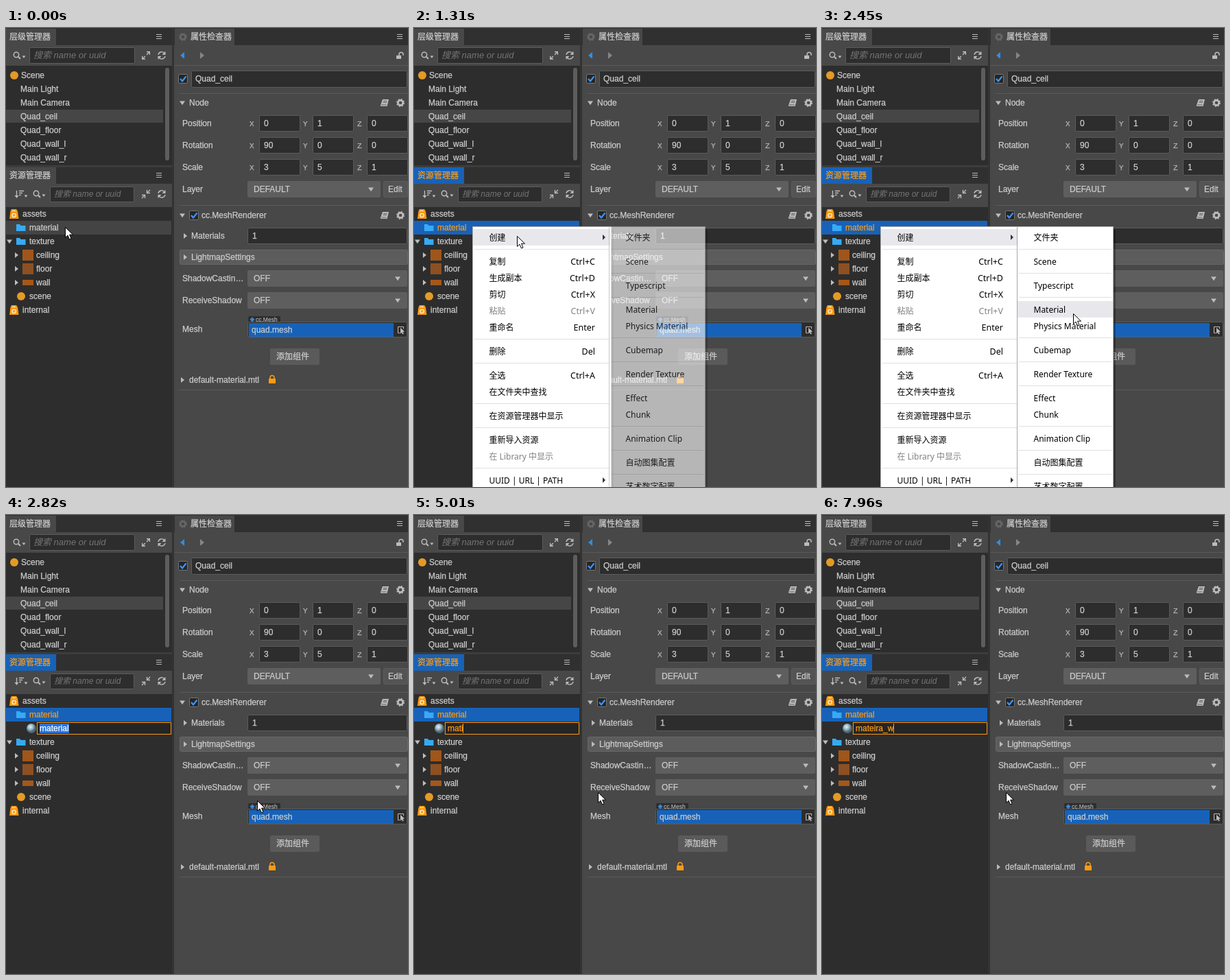
Recreate the animation shown at these times as an HTML page. Size 586x669 px, loop 8000 ms.

```html
<!DOCTYPE html>
<html lang="zh-CN">
<head>
<meta charset="utf-8">
<title>Create material</title>
<style>
html, body { margin: 0; width: 586px; height: 669px; overflow: hidden; background: #484848; }
svg { display: block; }
text { font: 12px "Liberation Sans", "Noto Sans CJK SC", sans-serif; color: #ccc; fill: currentColor;
  stroke: currentColor; stroke-width: .25px; white-space: pre; }
.menu text, #tooltip text { font-family: "Noto Sans", "Noto Sans CJK SC", sans-serif; color: #000; stroke: none; }
.menu .off { color: #808080; }
.menu .key { font-size: 12.5px; }
.mono { font: 11px "Liberation Mono", monospace; color: #b4b4b4; }
.hint { font-style: italic; color: #757575; stroke: none; }
rect { shape-rendering: crispEdges; }
rect.round { shape-rendering: auto; }
</style>
</head>
<body>
<svg id="stage" width="586" height="669" viewBox="0 0 586 669"></svg>
<script>
const BLUE = '#1762b8', ORANGE = '#fd9a14', DARK = '#2d2d2d', BODY = '#484848', ICON = '#bcbcbc';

// Drawing helpers; text is placed by the middle of its line.
const rect = (x, y, w, h, fill, more = '') => `<rect x="${x}" y="${y}" width="${w}" height="${h}" fill="${fill}" ${more}/>`;
const text = (x, y, s, cls = '', more = '') => `<text x="${x}" y="${y + 4}" class="${cls}" ${more}>${s}</text>`;
const path = (d, fill, more = '') => `<path d="${d}" fill="${fill}" ${more}/>`;
const line = (d, stroke = ICON, w = 1.4) => path(d, 'none', `stroke="${stroke}" stroke-width="${w}"`);
const group = (id, content, cls = '') => `<g id="${id}" class="${cls}">${content}</g>`;
const place = (x, y, content) => `<g transform="translate(${x} ${y})">${content}</g>`;
const box = (x, y, w, h, fill = DARK, stroke = '#5c5c5c') =>
  rect(x + .5, y + .5, w - 1, h - 1, fill, `class="round" rx="2" stroke="${stroke}"`);
const rightArrow = (x, y, fill = ICON) => path(`M${x} ${y - 4}l5 4l-5 4z`, fill);
const downArrow = (x, y, r = 4, fill = ICON) => path(`M${x - r} ${y - r * .6}h${2 * r}l${-r} ${r * 1.4}z`, fill);

// Icons
const burger = (x, y) => [-4, -1, 2].map(d => rect(x - 4, y + d, 8, 1, ICON)).join('');
const magnifier = (x, y) => place(x, y,
  `<circle cx="-1" cy="-1" r="3.7" fill="none" stroke="${ICON}" stroke-width="1.5"/>` +
  line('M2 2L5 5', ICON, 2)) + downArrow(x + 10, y + 2, 2.5);
const refresh = (x, y) => place(x, y, line('M-5 -1A5 5 0 0 1 4 -3M5 1A5 5 0 0 1 -4 3') +
  path('M5.5 -6v5h-5zM-5.5 6v-5h5z', ICON));
const expand = (x, y) => place(x, y, line('M1 -1L5 -5M-1 1L-5 5') + line('M1 -5.3H5.3V-1M-1 5.3H-5.3V1'));
const collapse = (x, y) => place(x, y, line('M2 -2L6 -6M-2 2L-6 6') + line('M1.5 -6V-1.5H6M-1.5 6V1.5H-6'));
const sortIcon = (x, y) => place(x, y, line('M-3.5 -5V4') + path('M-6.5 2h6l-3 4z', ICON) +
  line('M0 -4.5H7M0 -1.5H5M0 1.5H3')) + downArrow(x + 10, y + 3, 2.5);
const gear = (x, y, fill = ICON) => place(x, y,
  `<circle r="3.6" fill="none" stroke="${fill}" stroke-width="2.6"/>` +
  `<circle r="5.2" fill="none" stroke="${fill}" stroke-width="1.6" stroke-dasharray="2.1 1.984"/>`);
const book = (x, y) => place(x, y, path('M-3 -5H6L3.5 5H-5.5Q-7 4 -5.5 2Z', ICON) +
  line('M-2 -2.5H3.5M-2.5 -.5H3M-5 3H2.5', '#555', .9));
const folder = (x, y) => path(`M${x} ${y - 5}h5l1.5 2h7v8h-13.5z`, '#37aaf5');
const bag = (x, y) => path(`M${x + 3} ${y - 7}h7l2 3l1.5 11h-13.5l1.5 -11z`, ORANGE) +
  `<circle cx="${x + 6.7}" cy="${y + 2}" r="2.6" fill="none" stroke="#fff0cf" stroke-width="1.4"/>` +
  rect(x + 4, y - 5, 5, 1, '#fff0cf');
const dot = (x, y) => `<circle cx="${x}" cy="${y}" r="6" fill="#e49a25"/>`;
const padlock = (x, y, w, fill, shift = 0) => rect(x - w / 2, y - 1, w, w * .7, fill) +
  line(`M${x - 3 + shift} ${y - 1}v-1.500a3 3 0 0 1 6 0v1.500`, fill, 1.5);
const checkbox = (x, y) => box(x, y, 14, 14, '#252525', '#777') +
  line(`M${x + 3} ${y + 7}l3 3.5l5.5 -7`, '#3d94ff', 2.2);

function leftPanels() {
  const names = ['Main Light', 'Main Camera', 'Quad_ceil', 'Quad_floor', 'Quad_wall_l', 'Quad_wall_r'];
  return rect(0, 0, 245, 669, '#3a3a3a') +
    rect(0, 0, 242, 25, '#303030') + rect(0, 1, 73, 24, BODY) + rect(0, 25, 242, 30, BODY) +
    text(5, 13, '层级管理器') + burger(223, 13) +
    magnifier(16, 40) + box(34, 28, 154, 24) + text(40, 40, '搜索 name or uuid', 'hint', 'style="font-size:13px"') +
    expand(204, 40) + refresh(227, 40) +
    rect(0, 55, 242, 145, DARK) + rect(0, 119, 229, 19, '#464646') +
    dot(12, 69) + text(22, 69, 'Scene') + names.map((n, i) => text(21, 89 + 20 * i, n)).join('') +
    rect(232, 58, 6, 135, '#5d5d5d', 'class="round" rx="3"') +
    rect(0, 200, 242, 3, '#3c3c3c') + rect(0, 203, 242, 25, '#303030') + rect(0, 227, 242, 34, BODY) +
    `<rect id="tab" x="0" y="203" width="73" height="24"/>` + text(5, 215, '资源管理器', '', 'id="tabName"') +
    burger(223, 215) + sortIcon(19, 242) + magnifier(45, 242) +
    box(64, 231, 123, 23) + text(70, 242, '搜索 name or uuid', 'hint') + collapse(204, 242) + refresh(227, 242) +
    rect(0, 261, 242, 408, DARK) +
    `<rect id="row" x="0" y="281" width="241" height="20"/>` +
    bag(5, 271) + text(24, 271, 'assets') + folder(15, 291) + text(34, 291, 'material', '', 'id="rowName"') +
    group('rest', downArrow(5, 311) + folder(15, 311) + text(34, 311, 'texture') +
      ['ceiling', 'floor', 'wall'].map((n, i) => rightArrow(13, 331 + 20 * i) + text(44, 331 + 20 * i, n)).join('') +
      rect(24, 323, 16, 16, '#a0561a') + rect(24, 343, 16, 16, '#8c5022') + rect(24, 367, 16, 8, '#a5581a') +
      dot(22, 391) + text(34, 391, 'scene') + bag(5, 411) + text(24, 411, 'internal')) +
    rect(242, 0, 3, 669, '#333');
}

function inspector() {
  const vector = (label, y, values) => text(257, y, label) + values.map((v, i) => {
    const x = [369, 447, 526][i];
    return text(x - 14, y, 'XYZ'[i], 'mono') + box(x, y - 12, 60, 24) + text(x + 7, y, v);
  }).join('');
  const select = (label, x, y, w, value) => text(257, y, label) +
    rect(x, y - 12, w, 24, '#5e5e5e', 'class="round" rx="2"') + text(x + 9, y, value) + downArrow(x + w - 14, y);
  const rule = y => rect(253, y, 333, 1, '#5a5a5a');
  const heading = (y, x, label) => downArrow(257, y) + text(x, y, label) + book(552, y) + gear(575, y);
  return rect(245, 0, 341, 669, BODY) + rect(245, 0, 341, 25, '#303030') + rect(246, 1, 87, 24, BODY) +
    gear(258, 13, '#666') + text(269, 13, '属性检查器') + burger(574, 13) +
    path('M260 35v10l-6 -5z', '#2f8de4') + path('M283 35v10l6 -5z', '#858585') + padlock(572, 41, 7, ICON, 4) +
    rect(245, 54, 341, 1, '#5a5a5a') +
    checkbox(251, 67) + box(270, 62, 315, 25) + text(276, 74, 'Quad_ceil') +
    rule(95) + heading(109, 267, 'Node') +
    vector('Position', 139, [0, 1, 0]) + vector('Rotation', 171, [90, 0, 0]) + vector('Scale', 203, [3, 5, 1]) +
    select('Layer', 352, 235, 194, 'DEFAULT') + box(550, 223, 36, 24, '#545454') + text(557, 235, 'Edit') +
    rule(258) + heading(273, 285, 'cc.MeshRenderer') + checkbox(267, 266) +
    rightArrow(259, 303) + text(270, 303, 'Materials') + box(352, 291, 233, 24) + text(359, 303, '1') +
    box(253, 323, 333, 22, '#5c5c5c', '#686868') + rightArrow(259, 334) + text(270, 334, 'LightmapSettings') +
    select('ShadowCastin…', 352, 365, 233, 'OFF') + select('ReceiveShadow', 352, 397, 233, 'OFF') +
    text(257, 439, 'Mesh') + rect(353, 420, 47, 9, '#2e2e2e', 'class="round" rx="2"') +
    path('M359 421.500l3.500 3.500l-3.500 3.500l-3.500 -3.500z', '#3987dd') +
    `<text x="364" y="427.500" style="font-size:8.500px;stroke:none">cc.Mesh</text>` +
    box(352, 428, 233, 23) + rect(354, 430, 211, 20, BLUE) + text(358, 440, 'quad.mesh') +
    line('M579.500 438.500v-3h-8v9h3', ICON, 1) + path('M575 437l6 5.500l-2.500 .5l1.300 2.600l-1.600 .8l-1.300 -2.700l-1.900 1.800z', ICON) +
    rect(385, 467, 72, 24, '#5a5a5a', 'class="round" rx="2"') + text(394, 479, '添加组件') +
    rightArrow(255, 513) + text(267, 513, 'default-material.mtl') + padlock(388, 512, 10, ORANGE) +
    rule(527);
}

// Items are grouped; a separator line stands between groups.
function menu(x, right, groups, highlightId) {
  let y = 306, out = rect(x + 4, 294, right - x, 400, '#000', 'opacity=".3"') +
    rect(x + .5, 289.5, right - x, 400, '#fff', 'stroke="#a5a5a5"') +
    `<rect id="${highlightId}" x="${x + 1}" y="293" width="${right - x - 1}" height="24" fill="#e8e8ec"/>`;
  groups.forEach((items, i) => {
    if (i) out += rect(x + 3, y - 19, right - x - 5, 1, '#e0e0e0');
    for (const item of items) {
      const [label, key = '', off = ''] = item.split('/');
      out += text(x + 24.5, y, label, off);
      out += key === '>' ? path(`M${x + 190} ${y - 5}l4 4l-4 4z`, '#333')
        : text(x + 179, y, key, `key ${off}`, 'text-anchor="end"');
      y += 24;
    }
    y += 11;
  });
  return out;
}

const mainItems = [['创建/>'],
  ['复制/Ctrl+C', '生成副本/Ctrl+D', '剪切/Ctrl+X', '粘贴/Ctrl+V/off', '重命名/Enter'],
  ['删除/Del'], ['全选/Ctrl+A', '在文件夹中查找'], ['在资源管理器中显示'],
  ['重新导入资源', '在 Library 中显示//off'], ['UUID | URL | PATH/>']];
const createItems = [['文件夹'], ['Scene'], ['Typescript'], ['Material', 'Physics Material'], ['Cubemap'],
  ['Render Texture'], ['Effect', 'Chunk'], ['Animation Clip'], ['自动图集配置'], ['艺术数字配置']];

const renameBox = '<defs><radialGradient id="ball" cx=".4" cy=".35"><stop offset="0" stop-color="#e8f4fa"/>' +
  '<stop offset=".6" stop-color="#8eb0c2"/><stop offset="1" stop-color="#4d6673"/></radialGradient></defs>' +
  '<circle cx="37" cy="311" r="7" fill="url(#ball)"/>' +
  rect(45.5, 302.5, 195, 17, '#252525', `stroke="${ORANGE}"`) +
  rect(49, 304, 43, 14, '#2a72d8', 'id="selection"') + text(49, 311, '', '', 'id="name"') +
  rect(0, 304, 1, 14, ORANGE, 'id="caret"');
const tooltip = rect(272, 427, 223, 21, '#000', 'opacity=".3"') +
  rect(268.5, 423.5, 222, 20, '#fff', 'stroke="#767676"') +
  text(276, 434, '是否接收并显示其它物体产生的阴影。', '', 'style="color:#575757"');

const stage = document.getElementById('stage');
stage.innerHTML = leftPanels() + inspector() + group('rename', renameBox) + group('tooltip', tooltip) +
  group('mainMenu', menu(85, 287, mainItems, 'mainHover'), 'menu') +
  group('subMenu', menu(284, 424, createItems, 'subHover'), 'menu') +
  group('cursor', path('M.5 .5V15.500L4 12.200L6.500 18L9 17L6.600 11.200H11.500Z', '#fff', 'stroke="#000"'));

const el = id => document.getElementById(id);
const show = (id, opacity) => { el(id).style.display = opacity ? '' : 'none'; el(id).style.opacity = +opacity; };
const fill = (id, color) => { el(id).style.fill = color; };
const ink = (id, color) => { el(id).style.color = color; };

// Each entry: start time, then the values held from there on.
const cursorSteps = [[0, 86, 290], [920, 105, 294], [1040, 131, 300], [1160, 146, 302], [1310, 150, 303],
  [1700, 178, 304], [1820, 218, 304], [1940, 258, 303], [2060, 300, 304],
  [2210, 335, 330], [2330, 357, 376], [2450, 366, 416], [3100, 268, 404]];
const hoverSteps = [[0, 0], [2060, 293], [2210, 328], [2330, 363], [2450, 398]];
const typing = [[0, 'material', 0], [3900, 'm', 1], [4020, 'ma', 1], [4140, 'mat', 1], [4700, 'mat', 0],
  [5010, 'mati', 1], [5280, 'mat', 1], [5400, 'mate', 1], [5640, 'matei', 1], [5790, 'mateir', 1],
  [6160, 'mateira', 1], [6590, 'mateira', 0], [6970, 'mateira_', 1], [7400, 'mateira_', 0], [7960, 'mateira_w', 1]];
const current = (steps, t) => steps.findLast(s => s[0] <= t);

function render(t) {
  const active = t >= 400, renaming = t >= 2820;
  fill('tab', active ? BLUE : BODY);
  ink('tabName', active ? ORANGE : '#ccc');
  fill('row', active ? BLUE : '#444');
  ink('rowName', active ? ORANGE : '#ccc');
  el('rest').setAttribute('transform', `translate(0 ${renaming ? 20 : 0})`);

  show('mainMenu', t >= 520 && !renaming);
  show('mainHover', t >= 920);
  show('subMenu', renaming || t < 1310 ? 0 : t < 1430 ? .6 : 1);
  const hoverY = current(hoverSteps, t)[1];
  show('subHover', hoverY > 0);
  el('subHover').setAttribute('y', hoverY);

  show('rename', renaming);
  const [since, name, caret] = current(typing, t);
  el('name').textContent = name;
  ink('name', since ? ORANGE : '#fff');
  show('selection', !since);
  show('caret', caret);
  if (renaming) el('caret').setAttribute('x', Math.floor(49 + el('name').getComputedTextLength()));
  show('tooltip', t < 3750 || t >= 4140 ? 0 : t < 3900 ? 1 : t < 4020 ? .7 : .3);

  const [, x, y] = current(cursorSteps, t);
  el('cursor').setAttribute('transform', `translate(${x} ${y})`);
}

const start = performance.now();
function tick() {
  render((performance.now() - start) % 8000);
  requestAnimationFrame(tick);
}
tick();
</script>
</body>
</html>
```
